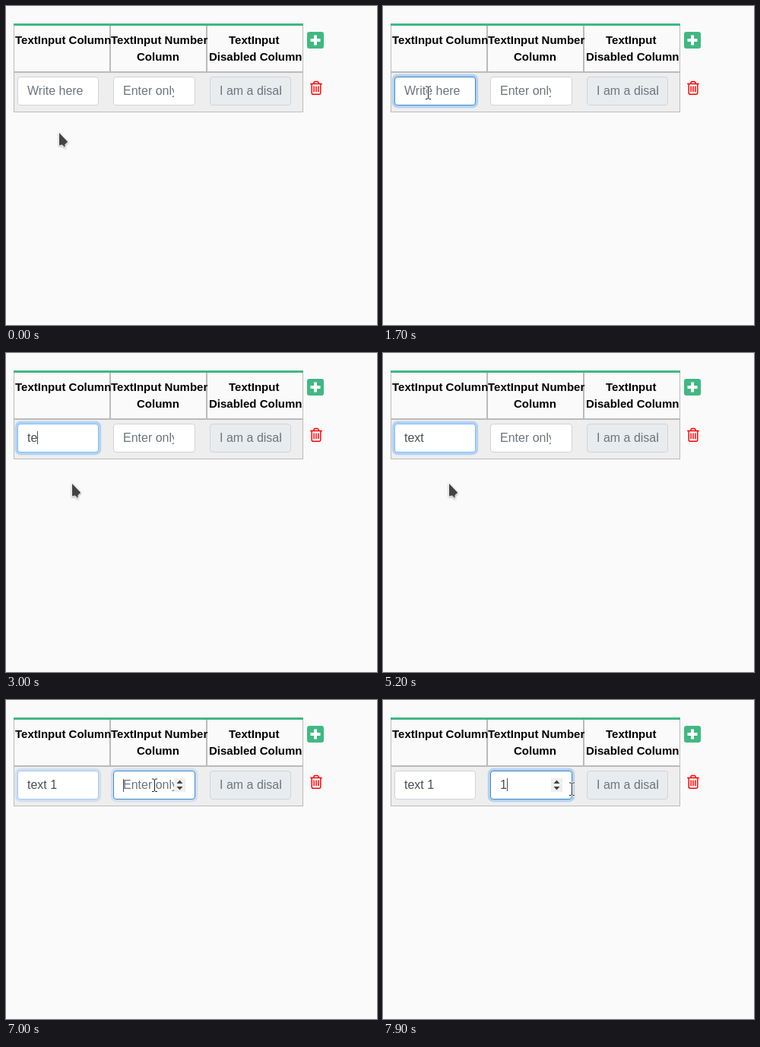
Write an HTML page that moves like this. It is 488 px wide and 420 px high and loops after 8 s.

```html
<!DOCTYPE html>
<html lang="en">
<head>
<meta charset="utf-8">
<title>Editable table</title>
<style>
html, body { margin: 0; width: 100%; height: 100%; overflow: hidden; background: #fafafa; }
body { position: relative; font-family: "Liberation Sans", Arial, sans-serif; }
div, svg { position: absolute; box-sizing: border-box; }
svg { overflow: visible; }
.th { font: bold 15px/22.5px "Liberation Sans", Arial, sans-serif; color: #000; white-space: nowrap; }
.line { background: #bbb; }
.field { top: 93px; height: 38px; border: 1px solid #ced4da; border-radius: 4px; background: #fff; }
.field div { left: 12px; top: 6px; height: 24px; font-size: 16px; line-height: 24px;
  white-space: pre; overflow: hidden; color: #6c757d; }
#caret { width: 1px; height: 17px; background: #495057; }
</style>
</head>
<body>
<div style="left:10px;top:87px;width:381px;height:53px;background:#eee"></div>
<div class="line" style="left:10px;top:26px;width:1px;height:114px"></div>
<div class="line" style="left:136px;top:24px;width:2px;height:63px"></div>
<div class="line" style="left:263px;top:24px;width:2px;height:63px"></div>
<div class="line" style="left:390px;top:26px;width:1px;height:114px"></div>
<div class="line" style="left:10px;top:86px;width:381px;height:2px"></div>
<div class="line" style="left:10px;top:139px;width:381px;height:1px"></div>
<div style="left:10px;top:23px;width:381px;height:3px;background:#41b883"></div>

<div class="th" style="left:12px;top:34px">TextInput Column</div>
<div class="th" style="left:138px;top:34px">TextInput Number</div>
<div class="th" style="left:172px;top:56px">Column</div>
<div class="th" style="left:293px;top:34px">TextInput</div>
<div class="th" style="left:267px;top:56px">Disabled Column</div>

<div class="field" style="left:15px;width:107px"><div style="width:81px"></div></div>
<div class="field" style="left:141px;width:108px"><div style="width:67px"></div></div>
<div class="field" style="left:268px;width:107px;background:#e9ecef"><div style="width:81px">I am a disabled input</div></div>

<svg width="488" height="420" style="left:0;top:0">
  <rect x="396" y="34" width="22" height="22" rx="3" fill="#41b883"/>
  <path d="M400.5 45h13M407 38.5v13" stroke="#fff" stroke-width="4" stroke-linecap="butt"/>
  <g transform="translate(400 98.7) scale(.727 .76) translate(-3 -2)" fill="none" stroke="#f00" stroke-width="2">
    <path d="M4 7h20" stroke-linecap="round"/>
    <path d="M6 7v15.5q0 2.5 2 2.5h12q2 0 2-2.5V7M9 7l1.6-3.4q.4-.6 1.1-.6h4.6q.7 0 1.1.6L19 7M10 11v10M14 11v10M18 11v10"/>
  </g>
  <path id="wave" fill="none" stroke="#f22" stroke-width=".8"/>
  <g id="spin">
    <rect x="221" y="103" width="15" height="18" fill="#efefef"/>
    <path d="M224.5 110l4-4.5 4 4.5zM224.5 114l4 4.5 4-4.5z" fill="#444"/>
  </g>
</svg>
<div id="caret"></div>
<svg id="pointer" width="1" height="1" style="left:0;top:0">
  <g id="arrow" style="filter:drop-shadow(0 1px 1px #0005)">
    <path d="M0 0V16.5L3.8 15.4 7.6 19.3V15.2L11.3 11.7z" fill="#444" stroke="#fff" stroke-width="1.4" paint-order="stroke"/>
  </g>
  <g id="beam" fill="none">
    <path id="bar" d="M-3 -8h2l1.5 1 1.5-1h2M-3 8.5h2l1.5-1 1.5 1h2M.5-7V7.5" stroke="#fff" stroke-width="2.6"/>
    <use href="#bar" style="stroke:#222"/>
    <path d="M-3 -8h2l1.5 1 1.5-1h2M-3 8.5h2l1.5-1 1.5 1h2M.5-7V7.5" stroke="#222"/>
  </g>
</svg>

<script>
const LOOP = 8000, STEP = 100;
const $ = id => document.getElementById(id);
const fields = [...document.querySelectorAll('.field')];

// time, x, y, over a field (1 = text beam)
const moves = [
  [0, 70, 167, 0], [300, 67, 150, 0], [400, 62, 126, 1], [500, 59, 117, 1], [600, 59, 114, 1],
  [2200, 65, 124, 1], [2300, 80, 157, 0], [2400, 86, 170, 0], [2600, 87, 172, 0],
  [6600, 123, 137, 0], [6700, 152, 122, 1], [6800, 178, 115, 1], [6900, 195, 112, 1],
  [7100, 205, 115, 1], [7200, 214, 124, 1], [7300, 221, 175, 0], [7400, 226, 123, 0],
  [7500, 231, 112, 1], [7700, 231, 95, 1], [7900, 248, 117, 1]
];
// time, text, caret x
const typing = [
  [[0, '', 28], [2900, 't', 32], [3000, 'te', 41], [4300, 'tex', 49], [4600, 'text', 53],
   [5600, 'text ', 57], [5800, 'text 1', 66]],
  [[0, '', 154], [7600, '1', 163]]
];
const hints = ['Write here', 'Enter only numbers'];
const focusAt = [1100, 7000];
const blinkOff = [[1700, 2200], [3600, 4200], [5200, 5600], [6400, 7000]];

const last = (list, t) => list.filter(e => e[0] <= t).pop() || list[0];
const between = (t, [a, b]) => t >= a && t < b;
const focused = t => t < focusAt[0] ? -1 : t < focusAt[1] ? 0 : 1;
const hovered = t => {
  const [, x, , over] = last(moves, t);
  return over ? +(x > 130) : -1;
};
// share of a short two-step transition
const soft = (which, i, t) => ((which(t) === i) + (which(t - STEP) === i)) / 2;
const mix = (a, b, p) => a.map((v, k) => v + (b[k] - v) * p);

$('wave').setAttribute('d', 'M28 119.5' + 'l2-1.5 2 1.5'.repeat(6));

function draw(t) {
  const active = focused(t), over = hovered(t);

  typing.forEach((keys, i) => {
    const text = last(keys, t)[1], box = fields[i], label = box.firstChild;
    label.textContent = text || hints[i];
    label.style.color = text ? '#495057' : '#6c757d';
    const glow = soft(focused, i, t);
    const edge = mix(mix([206, 212, 218], [128, 189, 255], glow), [62, 138, 200], soft(hovered, i, t));
    box.style.borderColor = `rgb(${edge.map(Math.round)})`;
    box.style.boxShadow = glow ? `0 0 0 3.2px rgba(0,123,255,${glow / 4})` : 'none';
  });

  const show = (id, on) => $(id).style.display = on ? '' : 'none';
  show('wave', active === 0 && t >= 5600);
  show('spin', active === 1 || over === 1);
  show('caret', active >= 0 && !blinkOff.some(r => between(t, r)));
  if (active >= 0) {
    const [, text, x] = last(typing[active], t);
    $('caret').style.left = x + 'px';
    $('caret').style.top = (text ? 103 : 104) + 'px';
  }

  const [, x, y, beam] = last(moves, t);
  $('pointer').style.transform = `translate(${x}px,${y}px)`;
  show('arrow', !beam);
  show('beam', beam);
}

const start = performance.now();
function tick(now) {
  const t = Math.max(0, now - start) % LOOP;
  draw(Math.floor(t / STEP) * STEP);
  requestAnimationFrame(tick);
}
draw(0);
requestAnimationFrame(tick);
</script>
</body>
</html>
```
